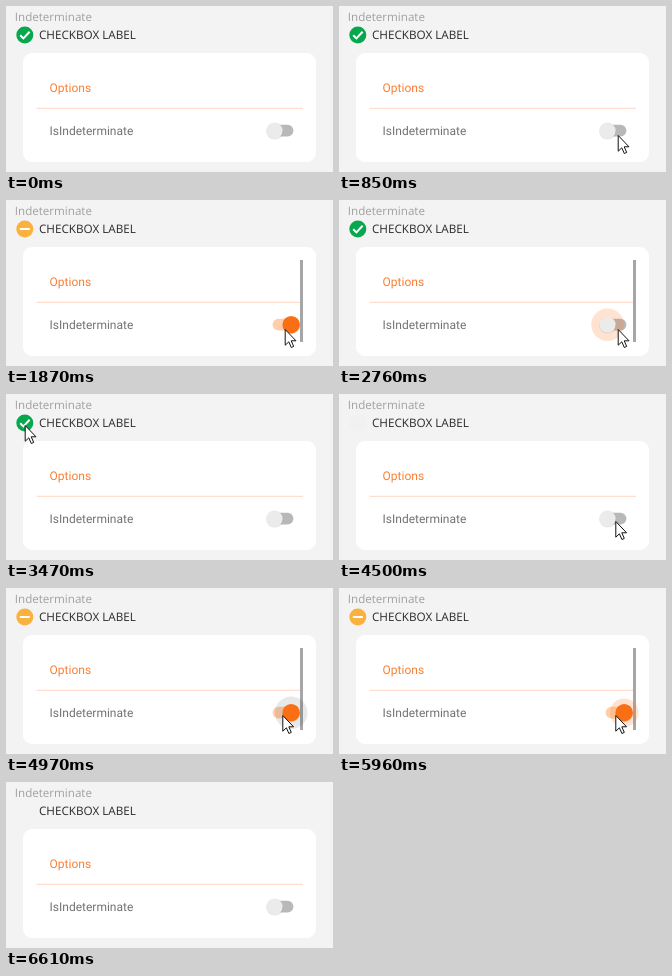
Animation of 327 by 166 pixels, one loop 7.33 s. Source, as an HTML page:

```html
<!DOCTYPE html>
<html lang="en">
<head>
<meta charset="utf-8">
<title>Indeterminate checkbox</title>
<style>
html, body { margin: 0; width: 100%; height: 100%; overflow: hidden; background: #f3f3f3; }
svg { display: block; }
.label { font: 11.7px "Open Sans", sans-serif; }
.option { font: 12px Roboto, sans-serif; }
</style>
</head>
<body>
<svg width="327" height="166" viewBox="0 0 327 166" text-rendering="geometricPrecision">
  <text class="label" x="8.8" y="15" fill="#a0a0a0" style="font-size:11.6px">Indeterminate</text>
  <text class="label" x="33" y="33.4" fill="#2a2a2a">CHECKBOX LABEL</text>
  <circle id="box" cx="18.8" cy="29" r="8.5"/>
  <path id="mark" fill="none" stroke="#fff" stroke-width="2"/>
  <rect x="17" y="47" width="293" height="109" rx="9" fill="#fff"/>
  <text class="option" x="43.6" y="86" fill="#fa7f33">Options</text>
  <path d="M30.5 102.3H297" stroke="#ffd6c4"/>
  <text class="option" x="43.6" y="129.2" fill="#727272">IsIndeterminate</text>
  <rect id="bar" x="294" y="60" width="3" height="82" fill="#a6a6a6"/>
  <rect id="track" x="266.6" y="118.8" width="20.8" height="11.6" rx="5.8"/>
  <circle id="ripple" cy="124.7"/>
  <circle id="shade" cy="125.2" fill="#000" opacity=".1"/>
  <circle id="thumb" cy="124.7"/>
  <path id="cursor" d="M.5 .5V16.2L4.1 12.8L6.6 18.5L9 17.4L6.5 11.8H11.3Z" fill="#fff" stroke="#111"/>
</svg>
<script>
const LOOP = 7330;
const $ = id => document.getElementById(id);
const set = (id, attrs) => {
  for (const k in attrs) $(id).setAttribute(k, attrs[k]);
};
const ramp = (t, a, b) => Math.min(1, Math.max(0, (t - a) / (b - a)));
const mix = (a, b, p) => a + (b - a) * p;
const mixColor = (a, b, p) => `rgb(${a.map((v, i) => Math.round(mix(v, b[i], p)))})`;
const smooth = p => p * p * (3 - 2 * p);
const easeOut = p => 1 - (1 - p) ** 2;

// Pointer tip: time, x, y, easing towards this point
const path = [
  [480, 330, 168], [850, 278.7, 129, easeOut],
  [2850, 278.7, 129], [3240, 25, 42, smooth], [3470, 18.7, 31, easeOut],
  [3890, 18.7, 31], [4170, 227.2, 114, smooth], [4210, 227.2, 114], [4500, 276.3, 127, easeOut],
  [6380, 276.3, 127], [6560, 240, 143, smooth]
];

// Each press: start, switched on, ripple fade start and end
const presses = [
  [1220, 1, 1400, 1450], [2520, 0, 2850, 3000],
  [4780, 1, 5910, 5960], [5910, 0, 6420, 6600]
];

function pointer(t) {
  const i = path.findIndex(k => k[0] > t);
  if (i < 0) return path.at(-1).slice(1, 3);
  if (!i) return path[0].slice(1, 3);
  const a = path[i - 1], b = path[i];
  const p = (b[3] || (v => v))(ramp(t, a[0], b[0]));
  return [mix(a[1], b[1], p), mix(a[2], b[2], p)];
}

function drawBox(t) {
  const within = (a, b) => t >= a && t < b;
  const dash = within(1315, 2615) || within(4875, 6005);
  const checked = !dash && t < 3700;
  set("box", {
    fill: dash ? "#fab13d" : checked ? "#07a84d" : "#f1f1f1",
    opacity: t < 6005 ? 1 : 0
  });
  set("mark", { d: dash ? "M13.8 29H23.8" : checked ? "M14.2 29.2L17.4 32.4L23.6 25.8" : "" });
}

function drawSwitch(t) {
  let on = 0, press;
  for (const p of presses) {
    if (t < p[0]) break;
    press = p;
    on = mix(1 - p[1], p[1], smooth(ramp(t, p[0] + 80, p[0] + 190)));
  }
  const x = mix(268.6, 285.2, on);
  const r = mix(8.1, 8.7, on);
  set("thumb", { cx: x, r, fill: mixColor([235, 235, 235], [251, 111, 20], on) });
  set("shade", { cx: x, r: r + .3 });
  set("track", { fill: mixColor([184, 184, 184], [255, 207, 172], on) });
  if (press) {
    const [start, turnsOn, fade, end] = press;
    set("ripple", {
      cx: x,
      r: mix(8, 16.3, easeOut(ramp(t, start - 40, start + 140))),
      fill: turnsOn ? "#000" : "#ff7314",
      opacity: (turnsOn ? .09 : .2) * (1 - ramp(t, fade, end))
    });
  } else set("ripple", { opacity: 0 });
}

function draw(now) {
  const t = now % LOOP;
  drawBox(t);
  drawSwitch(t);
  const bar = t < 4000
    ? ramp(t, 1220, 1360) - ramp(t, 2900, 3150)
    : ramp(t, 4780, 4920) - ramp(t, 6420, 6600);
  set("bar", { opacity: bar });
  set("cursor", {
    transform: `translate(${pointer(t)})`,
    opacity: t >= 510 && t < 6610 ? 1 : 0
  });
}

const start = performance.now();
(function frame() {
  draw(performance.now() - start);
  requestAnimationFrame(frame);
})();
</script>
</body>
</html>
```
